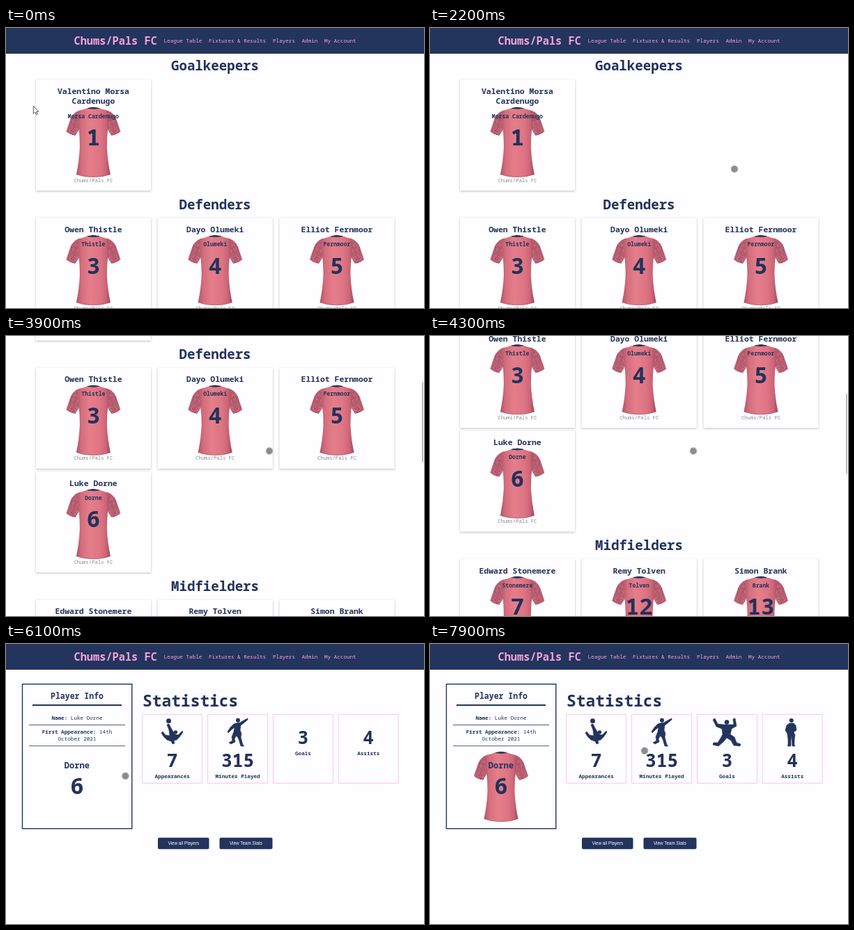
Write an HTML page that moves like this. It is 600 px wide and 403 px high and loops after 8000 ms.

```html
<!DOCTYPE html>
<html lang="en">
<head>
<meta charset="utf-8">
<title>Team players</title>
<style>
html, body { margin: 0; width: 100%; height: 100%; overflow: hidden; background: #fefdff; }
svg { display: block; width: 600px; height: 403px; }
text { font-family: "Noto Sans Mono", "DejaVu Sans Mono", monospace; fill: #22325c; white-space: pre; }
.sans { font-family: "Liberation Sans", Arial, sans-serif; }
.bold { font-weight: 700; }
.card { fill: #fefdff; filter: drop-shadow(0 1px 1.5px rgba(0, 0, 0, .25)); }
</style>
</head>
<body>
<svg id="stage" viewBox="0 0 600 403" xmlns="http://www.w3.org/2000/svg"></svg>
<script>
const NAVY = '#23345d', PINK = '#f5a3dc', PAPER = '#fefdff';
const LOOP = 8000;
const CLUB = 'Chums/Pals FC';

function text(x, y, size, content, { bold = true, anchor = 'middle', fill = '', cls = '' } = {}) {
  return `<text x="${x}" y="${y}" font-size="${size}" text-anchor="${anchor}" class="${bold ? 'bold ' : ''}${cls}"` +
    `${fill ? ` style="fill:${fill}"` : ''}>${content}</text>`;
}
const rect = (x, y, w, h, attrs) => `<rect x="${x}" y="${y}" width="${w}" height="${h}" ${attrs}/>`;
const line = (x1, x2, y, w) => `<path d="M${x1} ${y}H${x2}" stroke="${NAVY}" stroke-width="${w}"/>`;
const dot = (x, y, r) => `<circle cx="${x}" cy="${y}" r="${r}" fill="${NAVY}"/>`;
const figure = d => `<path d="${d}" fill="${NAVY}" stroke="${NAVY}" stroke-width=".6" stroke-linejoin="round"/>`;
const jersey = (x, y) => `<use href="#jersey" x="${x}" y="${y}"/>`;

// Mottled pattern for one sleeve
function speckles() {
  let seed = 11, out = '';
  const rand = () => (seed = (seed * 16807) % 2147483647) / 2147483647;
  for (let i = 0; i < 130; i++) {
    const x = -40 + rand() * 21, y = 6 + rand() * 35;
    const dx = rand() * 3 - 1.5, dy = rand() * 3 - 1.5;
    out += `<path d="M${x.toFixed(1)} ${y.toFixed(1)}l${dx.toFixed(1)} ${dy.toFixed(1)}" ` +
      `stroke="${i % 2 ? '#8c4257' : '#da8492'}" stroke-width=".8"/>`;
  }
  return out;
}

const SLEEVE = 'M-20 4.500Q-29 8-32.500 16L-39 35Q-34 39.500-26 41L-20.500 32Q-18 17-20 4.500Z';
const defs = `<defs>
  <linearGradient id="cloth">
    <stop offset="0" stop-color="#b05466"/><stop offset=".16" stop-color="#d56e7d"/>
    <stop offset=".4" stop-color="#e57e8a"/><stop offset=".7" stop-color="#de7483"/>
    <stop offset=".87" stop-color="#cb6576"/><stop offset="1" stop-color="#9c485c"/>
  </linearGradient>
  <clipPath id="sleeveClip"><path d="${SLEEVE}"/></clipPath>
  <g id="sleeve"><path d="${SLEEVE}" fill="#b85e71"/><g clip-path="url(#sleeveClip)">${speckles()}</g></g>
  <g id="jersey">
    <use href="#sleeve"/><use href="#sleeve" transform="scale(-1 1)"/>
    <path d="M-8 1Q-14 3.500-21 5Q-24 14-21 30Q-19.500 42-19.500 58Q-20.500 78-24.500 96.500Q-14 100.500 0 100.500T24.500 96.500Q20.500 78 19.500 58Q19.500 42 21 30Q24 14 21 5Q14 3.500 8 1Z" fill="url(#cloth)"/>
    <path d="M-24.500 96.500Q-14 100.500 0 100.500T24.500 96.500" fill="none" stroke="#b05466" stroke-width=".8"/>
    <path d="M-8 1.500Q0-1 8 1.500Q0 3 -8 1.500Z" fill="${NAVY}" stroke="${NAVY}" stroke-width="1"/>
  </g>
</defs>`;

function header() {
  const links = [[226.5, 'League Table'], [291, 'Fixtures &amp; Results'], [383, 'Players'], [424.5, 'Admin'], [457, 'My Account']];
  const style = { anchor: 'start', fill: PINK };
  return rect(0, 0, 600, 37, `fill="${NAVY}"`) +
    text(97.5, 23.7, 15.3, CLUB, style) +
    links.map(([x, label]) => text(x, 21, 7.62, label, { ...style, bold: false })).join('');
}

function card(column, top, names, shirtName, number) {
  const x = 43 + column * 174.8, mid = x + 82.4;
  const shirt = top + 10 + names.length * 15;
  return rect(x, top, 165, shirt + 120 - top, 'class="card"') +
    names.map((name, i) => text(mid, top + 20.6 + i * 14.8, 11.45, name)).join('') +
    jersey(mid, shirt) +
    text(mid, shirt + 15.5, 8.15, shirtName) +
    text(mid, shirt + 55.2, 32.5, number) +
    text(mid, shirt + 107.5, 7.2, CLUB, { bold: false, fill: '#8a8a8e' });
}

const heading = (y, label) => text(300, y, 19.1, label);

function squadPage() {
  return header() +
    heading(61.3, 'Goalkeepers') +
    card(0, 74, ['Valentino Morsa', 'Cardenugo'], 'Morsa Cardenugo', 1) +
    heading(260.5, 'Defenders') +
    card(0, 273.3, ['Owen Thistle'], 'Thistle', 3) +
    card(1, 273.3, ['Dayo Olumeki'], 'Olumeki', 4) +
    card(2, 273.3, ['Elliot Fernmoor'], 'Fernmoor', 5) +
    card(0, 422.7, ['Luke Dorne'], 'Dorne', 6) +
    heading(594, 'Midfielders') +
    card(0, 607, ['Edward Stonemere'], 'Stonemere', 7) +
    card(1, 607, ['Remy Tolven'], 'Tolven', 12) +
    card(2, 607, ['Simon Brank'], 'Brank', 13) +
    rect(38, 420.5, 175, 149.5, 'id="tap" fill="rgb(51,181,229)" fill-opacity=".4"');
}

const icons = {
  overhead: dot(233.5, 110.7, 3.4) + dot(243.5, 126.8, 2.6) +
    figure('M231 116L234 115L237 121L240 126L243 130L247 131L253 125L254 127L249 134L245 138L241 139L242 143L239 144L237 140L231 138L226 133L223 128L225 126L229 131L235 132L234 124Z'),
  volley: dot(333, 109.8, 3) +
    figure('M330 114L336 113L341 110L347 107L347 109L341 114L337 117L336 124L338 129L337 134L340 145L342 147H337L334 137L331 132L328 136L329 141L323 144L320 142L325 139L324 134L327 126L328 120L323 124L319 128L318 126L322 120L327 115Z'),
  cheer: dot(426, 112.5, 3.3) +
    figure('M422 116H436L435 108L438 107L440 118L433 122L431 130L437 134L440 142L446 144L445 147L436 146L432 139L426 135L421 141L414 147L406 145L407 142L413 142L418 134L420 130L419 122L411 119L406 109L409 107L413 115Z'),
  stand: dot(518.8, 110, 3) +
    figure('M516 114H522L525 117L526 124L522 127L524 131L523 138V145L524 147H520L519 132L518 139V147H513L514 145V138L513 129L510 124L512 117Z')
};

function statBox(x, number, label, late) {
  return rect(x, 101.3, 86, 99, 'fill="none" stroke="#f5c9ea" stroke-width="1"') +
    `<g ${late ? 'class="late"' : ''}>` +
    text(x + 43, 177.3, 26.3, number) + text(x + 43, 193, 7.65, label) + '</g>';
}

function button(x, w, label) {
  return rect(x, 278.8, w, 16.5, `rx="2" fill="${NAVY}"`) +
    text(x + w / 2, 289.3, 6.35, label, { bold: false, fill: '#fff', cls: 'sans' });
}

function playerPage() {
  const plain = content => `<tspan font-weight="400">${content}</tspan>`;
  return rect(0, 0, 600, 403, `fill="${PAPER}"`) + header() +
    rect(23.5, 57.7, 157.3, 208, `fill="none" stroke="${NAVY}" stroke-width="1.4"`) +
    text(102, 79.3, 11.5, 'Player Info') + line(38, 166, 88, 1.9) +
    text(102, 109, 7.63, 'Name: ' + plain('Luke Dorne')) + line(33, 171, 116.5, .8) +
    text(102, 129.3, 7.63, 'First Appearance: ' + plain('14th')) +
    text(102, 139.2, 7.63, plain('October 2021')) + line(33, 171, 146.7, .8) +
    `<g class="loaded">${jersey(102, 155)}</g>` +
    text(102, 179, 12.1, 'Dorne') + text(102, 216.3, 32.5, 6) +
    text(196, 90, 22.9, 'Statistics', { anchor: 'start' }) +
    statBox(195.7, 7, 'Appearances') + statBox(289.6, 315, 'Minutes Played') +
    statBox(383.5, 3, 'Goals', true) + statBox(477.2, 4, 'Assists', true) +
    icons.overhead + icons.volley +
    `<g class="loaded">${icons.cheer}${icons.stand}</g>` +
    button(218, 73.5, 'View all Players') + button(306.5, 76, 'View Team Stats');
}

const stage = document.getElementById('stage');
stage.innerHTML = defs + rect(0, 0, 600, 403, `fill="${PAPER}"`) +
  `<g id="squad">${squadPage()}</g><g id="player">${playerPage()}</g>` +
  rect(597, 0, 1.8, 115.5, 'id="bar" rx=".9" fill="#b3b2b6"') +
  '<path id="arrow" d="M39.3 112V123.3L41.9 121L43.6 124.8L45.3 124L43.6 120.4H46.9Z" fill="#fff" stroke="#333" stroke-width=".8"/>' +
  '<circle id="pointer" r="5" fill="#8c8c8c" stroke="#c4c4c4" stroke-width="1"/>';

const part = id => document.getElementById(id);
const [squad, player, bar, arrow, pointer, tap] = ['squad', 'player', 'bar', 'arrow', 'pointer', 'tap'].map(part);
const loaded = document.querySelectorAll('.loaded'), late = document.querySelectorAll('.late');

const clamp = v => Math.max(0, Math.min(1, v));
const ease = v => (1 - Math.cos(Math.PI * clamp(v))) / 2;
const show = (el, on) => el.setAttribute('visibility', on ? 'visible' : 'hidden');

// Pointer stops: time, x, y
const route = [
  [1800, 41, 108], [2150, 437, 203], [2400, 437, 203], [2700, 378, 165.5], [4550, 378, 165.5],
  [5050, 177.7, 174.3], [5600, 177.7, 174.3], [5900, 171.4, 190], [6500, 171.4, 190], [7300, 308, 153.7]
];

function position(t) {
  const next = route.findIndex(stop => stop[0] > t);
  if (next < 1) return route[next < 0 ? route.length - 1 : 0].slice(1);
  const [t0, x0, y0] = route[next - 1], [t1, x1, y1] = route[next];
  const k = ease((t - t0) / (t1 - t0));
  return [x0 + (x1 - x0) * k, y0 + (y1 - y0) * k];
}

function render(t) {
  const onPlayer = t >= 5700, ready = t >= 6450;
  const scroll = 286 * ease((t - 3200) / 1000);
  show(squad, !onPlayer);
  squad.setAttribute('transform', `translate(0 ${-scroll})`);
  player.style.display = onPlayer ? '' : 'none';
  loaded.forEach(el => show(el, onPlayer && ready));
  late.forEach(el => el.setAttribute('transform', `translate(0 ${ready ? 0 : -33})`));
  tap.style.display = t >= 5050 && !onPlayer ? '' : 'none';
  bar.setAttribute('y', .7 + scroll * .288);
  bar.setAttribute('opacity', t < 3200 ? 0 : 1 - clamp((t - 4650) / 250));
  show(arrow, t < 1800);
  show(pointer, t >= 1800);
  const [x, y] = position(t);
  pointer.setAttribute('cx', x);
  pointer.setAttribute('cy', y);
}

const start = performance.now();
function tick() {
  render((performance.now() - start) % LOOP);
  requestAnimationFrame(tick);
}
render(0);
requestAnimationFrame(tick);
</script>
</body>
</html>
```
